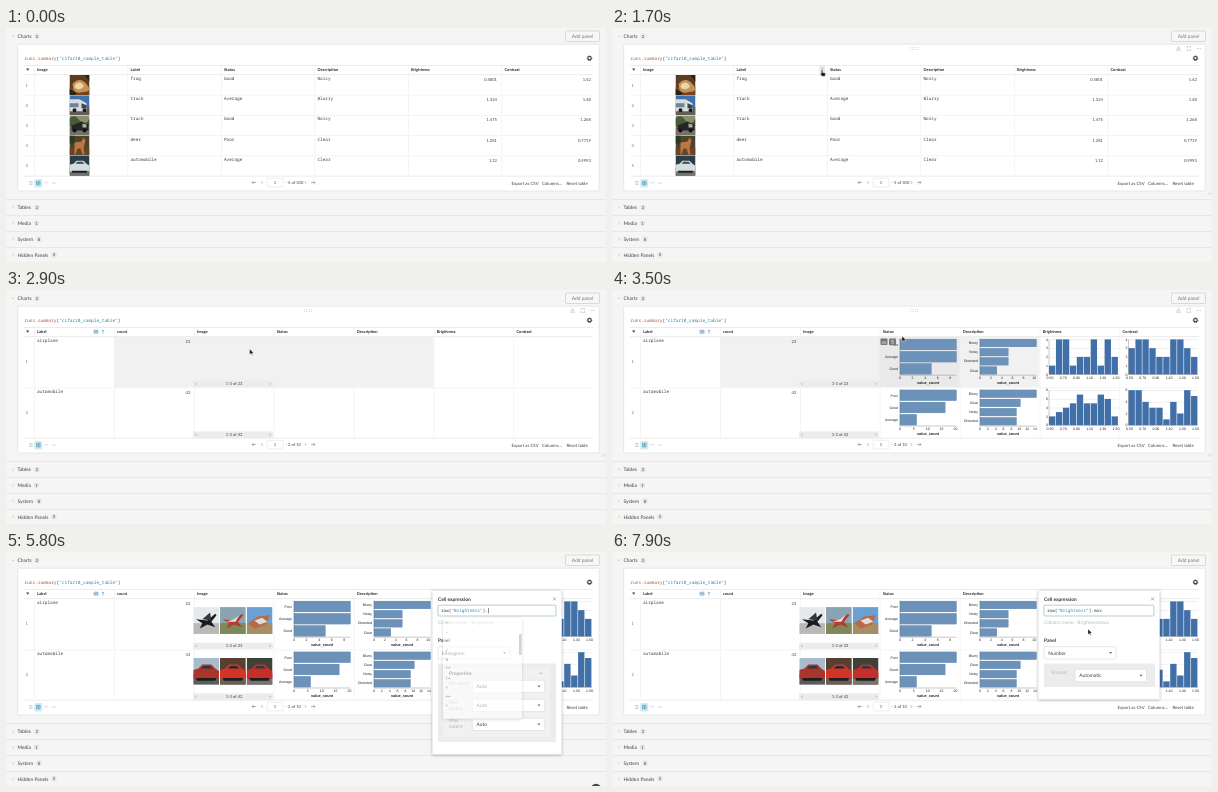
Write an HTML page that moves like this. It is 600 by 234 pixels and loops after 8000 ms.

```html
<!DOCTYPE html>
<html lang="en">
<head>
<meta charset="utf-8">
<title>Grouping a table by column</title>
<style>
html, body { margin: 0; width: 100%; height: 100%; overflow: hidden; background: #f5f5f5; }
svg { display: block; }
text { font: 4.35px Lato, "Open Sans", sans-serif; fill: #3c3f44; text-rendering: geometricPrecision; white-space: pre; }
.ui { font-size: 4.9px; }
.head { font-size: 4px; font-weight: 700; fill: #25282c; }
.title { font-size: 4.9px; font-weight: 700; fill: #33363b; }
.mono { font: 4.35px "Noto Sans Mono", "DejaVu Sans Mono", monospace; }
.num { font-size: 4.1px; }
.axis { font: 3.5px "Liberation Sans", Arial, sans-serif; fill: #222; }
.axisTitle { font: bold 3.8px "Liberation Sans", Arial, sans-serif; fill: #222; }
.row { fill: #2b87a3; }
.light { fill: #b4b6b9; font-size: 4.9px; }
.button { fill: #74777c; font-size: 4.9px; }
.menu { fill: #e6e6e6; }
.line { fill: none; stroke: #666; stroke-width: .5; }
.faint { fill: none; stroke: #aaa; stroke-width: .5; }
.menuLine { fill: none; stroke: #bbb; stroke-width: .5; }
</style>
</head>
<body>
<svg id="stage" width="600" height="234" viewBox="0 0 600 234"></svg>
<script>
const LOOP = 8000;

const text = (x, y, s, cls = "", anchor = "start") =>
  `<text x="${x}" y="${y}" class="${cls}" text-anchor="${anchor}">${s}</text>`;
const rect = (x, y, w, h, fill, extra = "") =>
  `<rect x="${x}" y="${y}" width="${w}" height="${h}" fill="${fill}" ${extra}/>`;
const path = (d, cls = "line", extra = "") => `<path d="${d}" class="${cls}" ${extra}/>`;
const shape = (d, fill) => `<path d="${d}" fill="${fill}"/>`;
const group = (id, body) => `<g id="${id}">${body}</g>`;
const hline = (y, x1, x2, color = "#dedede") => rect(x1, y, x2 - x1, .6, color);
const chevron = (x, y, dir, cls = "line", r = 1.2) => path({
  right: `M${x - r / 2} ${y - r}l${r} ${r}l${-r} ${r}`,
  left: `M${x + r / 2} ${y - r}l${-r} ${r}l${r} ${r}`,
  down: `M${x - r} ${y - r / 2}l${r} ${r}l${r} ${-r}`
}[dir], cls);
const dots = (x, y, n, step, color, r = .45) =>
  Array.from({ length: n }, (_, i) => `<circle cx="${x + i * step}" cy="${y}" r="${r}" fill="${color}"/>`).join("");

// Page and panel
function section(name, y, badge, badgeX, open) {
  return chevron(7, y, open ? "down" : "right", "faint") + text(11.5, y + 1.7, name, "ui") +
    rect(badgeX - 2.8, y - 2.8, 5.6, 5.6, "#e5e6e8", 'rx="2.4"') + text(badgeX, y + 1.5, badge, "num", "middle");
}

function page() {
  const closed = [["Tables", 2, 31], ["Media", 1, 30.5], ["System", 8, 33], ["Hidden Panels", 3, 48]];
  return rect(0, 0, 600, 234, "#f5f5f5") +
    section("Charts", 8.3, 2, 31, true) +
    rect(559.5, 3, 34, 10.5, "#f7f7f7", 'rx="1" stroke="#c6c6c6" stroke-width=".6"') +
    text(576.5, 10, "Add panel", "button", "middle") +
    rect(11.7, 16.2, 581.5, 146.8, "#fff", 'rx="1" stroke="#dcdcdc" stroke-width=".6"') +
    closed.map(([name, n, x], i) => hline(171 + i * 16, 0, 600) + section(name, 179.5 + i * 15.8, n, x)).join("") +
    `<text x="18.5" y="32" class="mono" style="font-size:4.45px"><tspan fill="#a8583c">runs</tspan>.<tspan fill="#a8583c">summary</tspan>[<tspan fill="#2d86a3">"cifar10_sample_table"</tspan>]</text>` +
    `<circle cx="583.5" cy="30.2" r="1.7" fill="none" stroke="#333" stroke-width="1.1"/><circle cx="583.5" cy="30.2" r="2.4" fill="none" stroke="#333" stroke-width=".6" stroke-dasharray=".95 .93"/>`;
}

const hoverTools = () =>
  dots(298.5, 19.4, 4, 2.4, "#aaa") + dots(298.5, 21.5, 4, 2.4, "#aaa") +
  path("M566.5 18.5l2 3.8h-4zM566.5 19.8v1.2", "faint") +
  path("M575 20v-1.5h1.5M577 18.5h1.5v1.5M578.5 21v1.5h-1.5M576.5 22.5h-1.5v-1.5", "faint") +
  dots(585, 20.5, 3, 1.6, "#999") + path("M596 166.5l3-3M598 166.5l1-1", "faint");

const footer = () =>
  path("M23 153.5h3.6M23 155h3.6M23 156.5h3.6", "faint") +
  rect(28.3, 151, 8, 8.5, "#d3ebf3", 'rx="1"') +
  path("M30.5 153.3h3.6v3.6h-3.6zM30.5 155h3.6M32.3 153.3v3.6", "line", 'style="stroke:#2b87a3"') +
  path("M38.4 155.5l1.3-1.3 1 1 1.3-1.2", "faint") + dots(46.4, 155, 3, 1.4, "#888", .4) +
  path("M250 154.5h-4m1.6-1.6l-1.6 1.6 1.6 1.6M305 154.5h4m-1.6-1.6l1.6 1.6-1.6 1.6") +
  chevron(256, 154.5, "left") + chevron(299.5, 154.5, "right") +
  rect(261, 150.3, 16, 8.6, "#fff", 'rx=".8" stroke="#ddd" stroke-width=".5"') + text(269, 156.2, "1", "num", "middle") +
  text(505.5, 156.6, "Export as CSV") + text(536, 156.6, "Columns...") + text(560.5, 156.6, "Reset table");

function grid(cols, rowY, range) {
  return hline(37.2, 18, 587) + hline(46.5, 18, 587) + hline(147.8, 18, 587) +
    rowY.map(y => hline(y, 18, 587, "#ededed")).join("") +
    path("M20 40.4h3.4l-1.7 2.4z", "", 'fill="#444"') + text(279.5, 156.2, range, "num") +
    cols.map(([name, x]) => rect(x - 2.9, 37.5, .5, 110, "#ebebeb") + text(x, 43.4, name, "head")).join("");
}

// Small flat pictures, drawn on a 20 by 20 field
const pic = (x, y, w, h, top, low, shapes) =>
  `<svg x="${x}" y="${y}" width="${w}" height="${h}" viewBox="0 0 20 20" preserveAspectRatio="none">` +
  rect(0, 0, 20, 20, top) + rect(0, 12, 20, 8, low) + shapes.map(([d, f]) => shape(d, f)).join("") + "</svg>";
const wheels = c => [["M3 15a2 2 0 1 0 4 0 2 2 0 1 0-4 0M13 15a2 2 0 1 0 4 0 2 2 0 1 0-4 0", c]];
const car = (body, glass) => [["M0 9l4-1 3-3h7l3 3 3 2v5l-3 1H1l-1-1z", body], ["M6 8l2-2h5l2 2z", glass], ["M2 15h16l-1 2H3z", "#1f1d1d"]];
const jet = "M2 9l9 1 6-5 1 1-4 5 3 4-6-2-6 3 2-4z";

const samples = [
  ["frog", "Good", "Noisy", "0.5801", "1.42", "#5d3d22", "#76421f", [["M3 9q7-8 14 0t-4 8q-6 2-9-2z", "#c59355"], ["M6 9q4-3 7 0t-2 5q-4 1-6-2z", "#ead7a9"], ["M0 14l7 4-1 2H0zM15 0l5 7V0z", "#29231e"]]],
  ["truck", "Average", "Blurry", "1.324", "1.48", "#3f72ad", "#635d56", [["M0 4h10l7 4v8H0z", "#d9ddde"], ["M0 8h9v4H0z", "#6e8397"], ["M12 8l5 2v3h-5z", "#394450"], ...wheels("#191b20")]],
  ["truck", "Good", "Noisy", "1.475", "1.268", "#8a8f72", "#777166", [["M0 3q5-5 10 2t10-2v8H0z", "#4b5b39"], ["M2 10l10-4 7 3v6H2z", "#24272a"], ["M13 8l4 1v3h-4z", "#b2aea0"], ...wheels("#111")]],
  ["deer", "Poor", "Clear", "1.281", "0.7719", "#4a442b", "#654629", [["M5 7l7-1 2-4 2 3-2 8 1 6h-2l-2-6H8l-2 6H5z", "#bd7641"], ["M0 0h5v8H0z", "#30391f"]]],
  ["automobile", "Average", "Clear", "1.12", "0.9993", "#263f49", "#6f7473", car("#d6dcdf", "#39464e")]
];

function flatTable() {
  const cols = [["Image", 31], ["Label", 124.5], ["Status", 218], ["Description", 311.5], ["Brightness", 405], ["Contrast", 498.5]];
  const step = 20.2;
  return grid(cols, [1, 2, 3, 4].map(i => 46.7 + i * step), "- 5 of 300") +
    samples.map(([label, status, desc, bright, contrast, top, low, art], i) => {
      const y = 47 + i * step, base = y + 5;
      return text(19.5, y + 11.6, i + 1, "num row") + pic(63.5, y, 20, 20, top, low, art) +
        text(124.5, base, label, "mono") + text(218, base, status, "mono") + text(311.5, base, desc, "mono") +
        text(491, base + 1, bright, "num", "end") + text(584.8, base + 1, contrast, "num", "end");
    }).join("");
}

// Grouped table
function bars(x, y, items, max, step) {
  const h = 36.6 / items.length, unit = 56.5 / max;
  let out = "";
  items.forEach(([name, v], i) => {
    out += text(x - 2, y + (i + .5) * h + 1.2, name, "axis", "end") +
      rect(x, y + i * h + .7, v * unit, h - 1.4, "#6d92b9", 'stroke="#557da6" stroke-width=".3"');
  });
  out += path(`M${x} ${y}v36.8h56.5`, "line", 'style="stroke:#777;stroke-width:.4"');
  for (let v = 0; v <= max; v += step) out += text(x + v * unit, y + 40.6, v, "axis", "middle");
  return out + text(x + 28, y + 45.8, "value_count", "axisTitle", "middle");
}

function histogram(x, y, heights, max) {
  const w = 6.95, step = max > 4 ? 2 : 1, unit = 35 / max;
  let out = "";
  for (let v = 0; v <= max; v += step) {
    out += hline(y + 35 - v * unit, x, x + 69.5, "#e6e6e6") + text(x - 1, y + 36.2 - v * unit, v, "axis", "end");
  }
  heights.forEach((v, i) => { out += rect(x + i * w, y + 35 - v * unit, w - .6, v * unit, "#416fa8"); });
  out += path(`M${x} ${y}v35h69.5`, "line", 'style="stroke:#777;stroke-width:.4"');
  for (let i = 0; i < 6; i++) out += text(x + 1 + i * 13.2, y + 39.6, (.5 + i * .2).toFixed(2), "axis", "middle");
  return out;
}

const thumbs = [
  [["#e6e8ea", "#b8bab6", [[jet, "#191b20"], ["M7 9l6-5 1 6z", "#34383e"]]],
   ["#8aa4b2", "#7d8956", [[jet, "#b53a32"], ["M5 11l6-2 4-3-3 5z", "#e9e2dd"]]],
   ["#6ba0d2", "#a68d62", [["M1 12l8-5 9-1-3 7-9 3z", "#b9694a"], ["M6 10l6-2 4 3-6 2z", "#e0ddd6"]]]],
  [["#a9bccb", "#5d5c5b", car("#a9362c", "#2c3742")],
   ["#57402f", "#6a5f58", car("#d63327", "#222a33")],
   ["#3c4238", "#77736d", car("#c62e29", "#2f3943")]]
];

const rowTop = [47.6, 98.4];
const pager = (y, n) => rect(187, y + 43, 80, 6.5, "#ececec") + chevron(190, y + 46.2, "left", "line", .9) +
  chevron(264, y + 46.2, "right", "line", .9) + text(228, y + 47.7, `1-3 of ${n}`, "num", "middle");

function groupedBase() {
  const cols = [["Label", 31], ["count", 111], ["Image", 191], ["Status", 270.7], ["Description", 350.8], ["Brightness", 430.7], ["Contrast", 510.5]];
  return grid(cols, [97.6], "- 2 of 10") + group("rowHover", rect(108.3, 47.1, 319.2, 50.3, "#f1f1f1")) +
    path("M88 40.2h4v3h-4zM88 41.6h4M90 40.2v3M97 43.6v-3.6m-1.2 1.2l1.2-1.2 1.2 1.2", "line", 'style="stroke:#3b83b5"') +
    [["airplane", 23], ["automobile", 42]].map(([name, n], i) =>
      text(31, rowTop[i] + 4.3, name, "mono") + text(19.5, rowTop[i] + 25.8, i + 1, "num row") +
      text(184.3, rowTop[i] + 5.2, n, "num", "end") + pager(rowTop[i], n)).join("");
}

function charts() {
  const [a, b] = rowTop.map(y => y + .8);
  return group("cellHover", rect(267.6, 47.1, 80, 50, "#e9e9e9")) +
    bars(288, a, [["Poor", 9], ["Average", 9], ["Good", 5]], 9, 2) +
    bars(288, b, [["Poor", 20.4], ["Good", 16.3], ["Average", 6]], 20.4, 5) +
    bars(368, a, [["Blurry", 10.4], ["Noisy", 5.2], ["Distorted", 5.2], ["Clear", 3.1]], 10.4, 2) +
    bars(368, b, [["Blurry", 14.4], ["Clear", 10.3], ["Noisy", 9.3], ["Distorted", 9.3]], 14.4, 2) +
    histogram(437, a + 1, [1, 4, 4, 1, 2, 2, 4, 1, 4, 2], 4) +
    histogram(437, b + 1, [2, 3, 4, 5, 7, 5, 5, 7, 6, 2], 8) +
    histogram(516.5, a + 1, [3, 4, 4, 3, 2, 2, 4, 4, 3, 2], 4) +
    histogram(516.5, b + 1, [6, 6, 4, 3, 3, 1, 4, 2, 6, 5], 6);
}

const cellTools = () => [268.5, 277].map(x => rect(x, 48.5, 7, 6.5, "#777", 'rx=".8"')).join("") +
  path("M270 53.2l1.4-1.8 1 1 .8-.8 1 1.6zM279 50.4h3M279 51.8h3M279 53.2h3", "line", 'style="stroke:#eee"');

const pictures = () => thumbs.map((list, r) =>
  list.map((p, i) => pic(187.3 + i * 26.7, rowTop[r] + 7.5, 25.8, 26.8, ...p)).join("")).join("");

// Column menu, drawn at its own origin
function menu() {
  const items = ["Column settings", "Group by", "Sort Asc", "Sort Desc", "Insert 1 right", "Insert 1 left", "Pin", "Remove", "Remove all right", "Remove all left"];
  const icons = ["M-1.6 0a1.6 1.6 0 1 0 3.2 0a1.6 1.6 0 1 0-3.2 0M-.3 0h.6", "M-1.8-1.2h3.6M-1.8 0h3.6M-1.8 1.2h3.6",
    "M0 2v-4m-1.2 1.2l1.2-1.2 1.2 1.2", "M0-2v4m-1.2-1.2l1.2 1.2 1.2-1.2", "M-.5-1.2l1.2 1.2-1.2 1.2", "M.5-1.2l-1.2 1.2 1.2 1.2",
    "M-1.6 1.6l1.4-1.4M-1-.8l2 2M-.4-.8l1.4-1 1 1-1 1.4", "M-1.3-1v3h2.6v-3M-1.8-1.2h3.6M-.6-1.8h1.2", "M-.5-1.2l1.2 1.2-1.2 1.2", "M.5-1.2l-1.2 1.2 1.2 1.2"];
  return rect(0, 0, 48.5, 109, "#1b1c1f", 'rx="1.2"') + rect(0, 0, 48.5, 10.4, "#3667b4", 'id="mark"') +
    [44.4, 65, 75.6].map(y => hline(y, 3, 45.5, "#55575b")).join("") +
    items.map((s, i) => {
      const y = 7.8 + i * 10.47;
      return text(4.8, y + 1.4, s, "menu") + path(icons[i], "menuLine", `transform="translate(41.5 ${y})"`);
    }).join("");
}

// Settings popup
const select = (x, y, w, label) =>
  rect(x, y, w, 12.4, "#fff", 'rx="1" stroke="#d8d8d8" stroke-width=".6"') + text(x + 4.3, y + 8, label, "ui") +
  shape(`M${x + w - 7} ${y + 5.4}h3.2l-1.6 2z`, "#777");

const frame = (w, h) => rect(426.3, 38.6, w, h, "#fff", 'rx="1" filter="url(#shadow)" stroke="#d9d9d9" stroke-width=".4"') +
  text(432, 49, "Cell expression", "title") +
  path(`M${w + 417.6} 45.4l3 3m0-3l-3 3`) +
  rect(432, 53.2, w - 11.5, 10.8, "#fff", 'rx="1" stroke="#86aebf" stroke-width=".6"') +
  text(432, 90, "Panel", "title");

function histogramPopup() {
  const fields = [["Bin mode"], ["Min", "extent"], ["Max", "extent"]];
  return frame(129.4, 163.6) + select(432, 94.7, 72, "Histogram") +
    text(432, 72.4, "Column name:  Brightness", "light") +
    rect(432, 111.5, 118, 78.5, "#ececec") + rect(437.5, 115.5, 106.5, 69.5, "#f1f1f1") +
    text(443, 123.4, "Properties", "title") + chevron(535, 121.4, "down") +
    fields.map((f, i) => f.map((s, j) => text(443, 133 + i * 18.5 + j * 6, s, "light")).join("") +
      select(466.3, 128.2 + i * 19, 72, "Auto")).join("");
}

const numberPopup = () => frame(121.4, 108.6) + select(432, 94.7, 72, "Number") +
  text(432, 72.4, "Column name:  Brightnessmax", "light") +
  rect(432, 111.5, 111, 23.5, "#ececec") + text(439.5, 122, "Format", "light") + select(463, 117.3, 71.5, "Automatic");

const suggestions = () => rect(437, 66, 79, 100.5, "#fff", 'rx="1" filter="url(#shadow)"') +
  rect(513, 82, 2.6, 21, "#b5b5b5", 'rx="1"') +
  ["+", "-", "*", "/", "%", "**", "!=", "&lt;", "==", ">"].map((s, i) => text(439.5, 72.4 + i * 9.2, s, "mono")).join("");

const stage = document.getElementById("stage");
stage.innerHTML =
  `<defs><filter id="shadow" x="-10%" y="-10%" width="120%" height="120%"><feDropShadow dx="0" dy=".8" stdDeviation="1.8" flood-opacity=".28"/></filter></defs>` +
  page() + group("hover", hoverTools()) + group("flat", flatTable()) +
  group("kebab", rect(207.5, 38, 5.6, 8, "#e8e8e8") + [40.3, 42, 43.7].map(y => dots(210.2, y, 1, 0, "#555")).join("")) +
  group("grouped", groupedBase()) + group("pictures", pictures()) + group("charts", charts()) + group("cellTools", cellTools()) +
  footer() + `<circle id="bubble" cx="590" cy="237" r="5.2" fill="#45474b"/>` +
  group("menu", menu()) + group("histogramPopup", histogramPopup()) + group("numberPopup", numberPopup()) +
  group("expression", `<text x="435" y="60.4" class="mono"><tspan>row[</tspan><tspan fill="#2d86b5">"Brightness"</tspan><tspan>]</tspan><tspan id="typed"></tspan></text>` +
    rect(0, 56, .5, 5.4, "#222", 'id="caret"')) +
  group("suggestions", suggestions()) +
  group("arrow", `<path d="M0 0V5.6L1.4 4.4 2.3 6.3 3.2 5.9 2.3 4.1H4Z" fill="#111" stroke="#fff" stroke-width=".4"/>`) +
  group("hand", `<path d="M-.7.3q.7-.7 1.3 0V2.5l2.4.6q.5.2.4.8L3 6.2H0L-1.8 4q-.1-.8.5-.6l.6.5z" fill="#111" stroke="#fff" stroke-width=".4"/>`);

const el = id => document.getElementById(id);
const show = (id, on) => el(id).setAttribute("visibility", on ? "inherit" : "hidden");
const place = (id, x, y) => el(id).setAttribute("transform", `translate(${x} ${y})`);
const within = (t, ...spans) => spans.some(([a, b]) => t >= a && t < b);

// Pointer stops: time, x, y
const pointer = [[500, 330, 118], [900, 262, 84], [1500, 210, 42], [2000, 210, 42], [2350, 222, 65], [2600, 222, 65],
  [3400, 290, 46], [3550, 290, 46], [3800, 503, 42], [3950, 512, 54], [4050, 512, 54], [4280, 477, 35], [4500, 477, 35], [4800, 482, 58],
  [6900, 482, 62], [7500, 476, 77], [8000, 476, 77]];

function pointerAt(t) {
  const i = pointer.findIndex(p => p[0] > t);
  if (i < 1) return pointer[0].slice(1);
  const [t0, x0, y0] = pointer[i - 1], [t1, x1, y1] = pointer[i];
  const p = (t - t0) / (t1 - t0), e = p * p * (3 - 2 * p);
  return [x0 + (x1 - x0) * e, y0 + (y1 - y0) * e];
}

function draw(t) {
  const [x, y] = pointerAt(t);
  const isGrouped = t >= 2700, popup = t >= 4100, isNumber = t >= 6800;
  const isHand = within(t, [1450, 2650], [3780, 4100]);
  const arrowOn = within(t, [500, 1450], [2650, 3780], [4100, 5200], [6900, LOOP]);
  show("hover", within(t, [500, 2000], [2700, 3850], [4100, 4400]));
  show("flat", !isGrouped);
  show("kebab", within(t, [1400, 2000]));
  show("grouped", isGrouped);
  show("rowHover", within(t, [2700, 3620]));
  show("pictures", t >= 3700);
  show("charts", t >= 3000);
  const cellOn = within(t, [3350, 3620]);
  show("cellHover", cellOn);
  show("cellTools", cellOn);
  show("bubble", within(t, [4200, 7500]));

  const second = within(t, [3850, 4100]);
  show("menu", within(t, [2000, 2650]) || second);
  place("menu", second ? 500 : 207.5, 47);
  const row = second ? 0 : Math.max(0, Math.min(9, Math.floor((y - 49.5) / 10.47)));
  el("mark").setAttribute("y", 2.6 + row * 10.47);

  show("histogramPopup", popup && !isNumber);
  show("numberPopup", isNumber);
  show("expression", popup);
  const typed = ".max".slice(0, [5600, 6150, 6300, 6450].filter(s => t >= s).length);
  el("typed").textContent = typed;
  el("caret").setAttribute("x", 435.3 + (17 + typed.length) * 2.61);
  show("caret", popup && !isNumber && (t < 4500 || t >= 5500 || t % 1000 < 500));
  const fade = Math.min(1, Math.max(0, (t - 5650) / 250)) * Math.min(1, Math.max(0, (6750 - t) / 150));
  el("suggestions").setAttribute("opacity", fade);

  show("arrow", arrowOn);
  show("hand", isHand);
  place("arrow", x, y);
  place("hand", x, y);
}

const start = performance.now();
function tick() {
  draw((performance.now() - start) % LOOP);
  requestAnimationFrame(tick);
}
tick();
</script>
</body>
</html>
```
